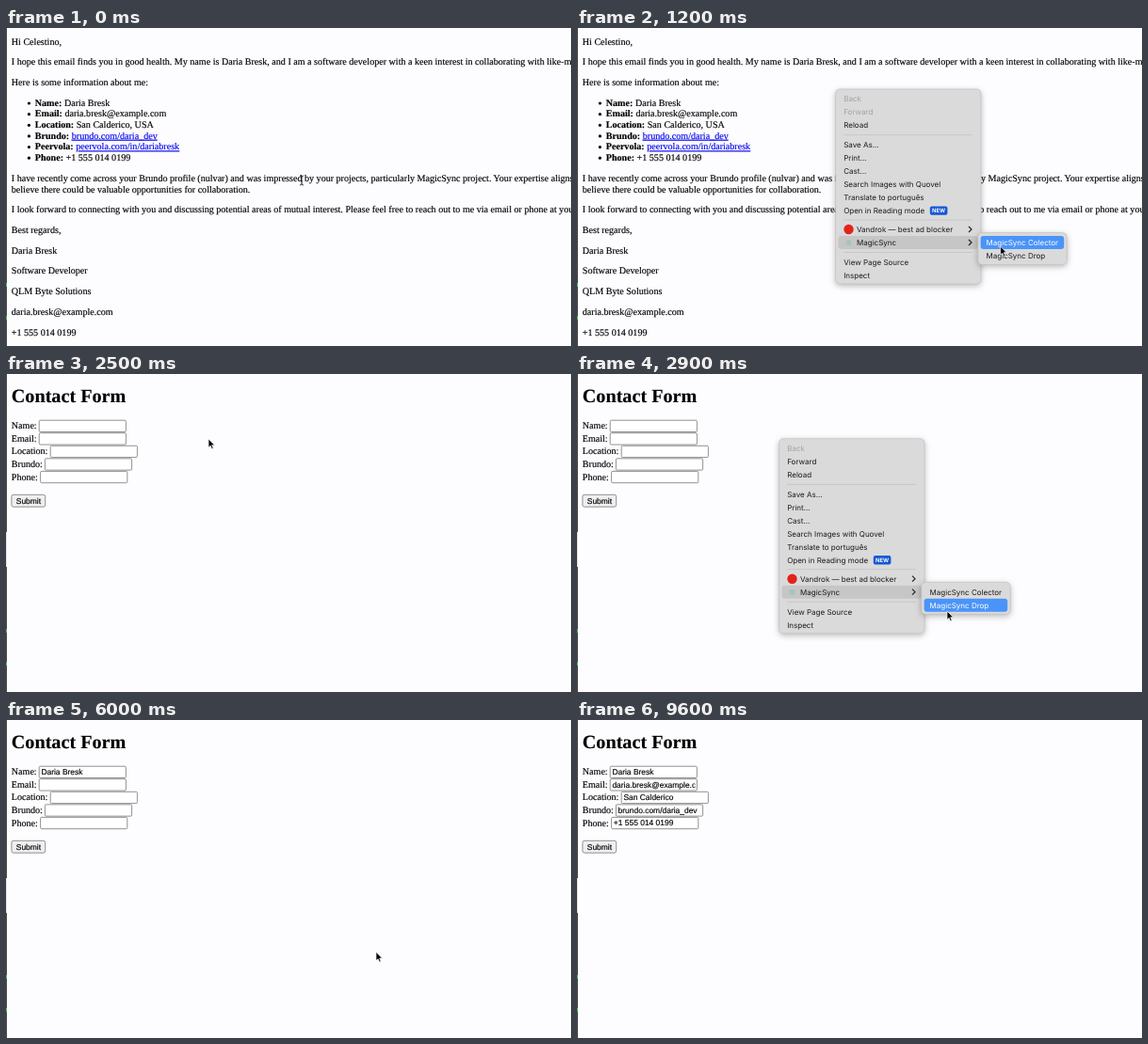
Recreate the animation shown at these times as an HTML page. Size 600 by 338 pixels, loop 9.9 s.

```html
<!DOCTYPE html>
<html lang="en">
<head>
<meta charset="utf-8">
<title>Form filler demo</title>
<style>
  html, body { margin: 0; width: 100%; height: 100%; overflow: hidden; background: #fdfcfe; }
  svg { display: block; width: 600px; height: 338px; }
  text { text-rendering: geometricPrecision; white-space: pre; }
  .page { font: 10.08px "Liberation Serif", Times, serif; }
  .page text { stroke: #000; stroke-width: .15; }
  .page .link { fill: #00e; stroke: #00e; text-decoration: underline; }
  .ui { font: 8.45px "Liberation Sans", Arial, sans-serif; }
  .menu { font: 8px Inter, sans-serif; }
  .panel { fill: #dadada; stroke: #bcbcbc; stroke-width: .6; }
  .shadow { filter: drop-shadow(0 2px 3px #0004); }
  .box { fill: #fff; stroke: #767676; stroke-width: .8; }
</style>
</head>
<body>
<svg viewBox="0 0 600 338">
  <defs>
    <clipPath id="emailClip"><rect x="36" y="62" width="89.5" height="14"/></clipPath>
  </defs>
  <rect width="600" height="338" fill="#fdfcfe"/>
  <rect width="1" height="338" fill="#4a4a4a"/>
  <path d="M.5 271v4M.5 306v4" stroke="#4fc04f"/>
  <g id="letter" class="page"></g>
  <g id="form" class="page">
    <rect y="168" width="1" height="37" fill="#e4e4e4"/>
    <text x="5.8" y="29.8" font-size="20.16" font-weight="bold">Contact Form</text>
    <rect class="box" x="5.9" y="128.3" width="35.8" height="12.9" rx="2" style="fill:#efefef"/>
    <text class="ui" x="10.8" y="137.8">Submit</text>
  </g>
  <g id="menu" class="menu">
    <g class="shadow"><rect class="panel" x="274.6" y="65" width="154.4" height="207" rx="4.5"/></g>
    <rect id="row" x="277.5" y="221" width="148.5" height="14" rx="3" fill="#c6c6c6"/>
    <path d="M283 113.7h137M283 204h137M283 238.5h137" stroke="#c2c2c2" stroke-width=".8"/>
    <circle cx="288.5" cy="214" r="5.2" fill="#e2231a"/>
    <circle cx="288.5" cy="228" r="3" fill="#a8c2c0"/>
    <rect x="374.8" y="189.4" width="18.6" height="9.4" rx="2" fill="#1558d6"/>
    <text x="384.1" y="196.3" font-size="5.9" font-weight="bold" fill="#fff" text-anchor="middle">NEW</text>
    <path d="M416 211l3 3-3 3M416 225l3 3-3 3" fill="none" stroke="#222" stroke-width="1.2"/>
    <g id="submenu">
      <g class="shadow"><rect class="panel" x="425.8" y="217.6" width="94.4" height="34" rx="4.5"/></g>
      <rect id="pick" x="428.6" width="88.6" height="14" rx="3" fill="#4a94f9"/>
    </g>
  </g>
  <g id="cursor">
    <path id="arrow" d="M0 0v9.2l2.1-1.9 1.5 3.3 1.6-.7-1.5-3.2h2.9z" stroke="#fff" stroke-width=".7"/>
    <path id="beam" d="M-2-5q2 0 2 1.5q0-1.5 2-1.5M-2 5q2 0 2-1.5q0 1.5 2 1.5M0-4v8M-1 1h2" fill="none" stroke="#222" stroke-width=".9"/>
  </g>
</svg>
<script>
const LOOP = 9900, STEP = 100;
const $ = id => document.getElementById(id);

function add(parent, tag, attrs, text = "") {
  const el = document.createElementNS("http://www.w3.org/2000/svg", tag);
  for (const key in attrs) el.setAttribute(key, attrs[key]);
  el.textContent = text;
  return parent.appendChild(el);
}
const show = (el, on) => el.setAttribute("visibility", on ? "inherit" : "hidden");

// Letter: [baseline, text]
const lines = [
  [17.6, "Hi Celestino,"],
  [39.3, "I hope this email finds you in good health. My name is Daria Bresk, and I am a software developer with a keen interest in collaborating with like-minded"],
  [61, "Here is some information about me:"],
  [163, "I have recently come across your Brundo profile (nulvar) and was impressed by your projects, particularly MagicSync project. Your expertise aligns with"],
  [174.6, "believe there could be valuable opportunities for collaboration."],
  [196.3, "I look forward to connecting with you and discussing potential areas of mutual interest. Please feel free to reach out to me via email or phone at your"],
  [218, "Best regards,"],
  [239.7, "Daria Bresk"],
  [261.4, "Software Developer"],
  [283.1, "QLM Byte Solutions"],
  [304.8, "daria.bresk@example.com"],
  [326.5, "+1 555 014 0199"],
];
for (const [y, text] of lines) add($("letter"), "text", { x: 5.8, y }, text);

const details = [
  ["Name:", "Daria Bresk"],
  ["Email:", "daria.bresk@example.com"],
  ["Location:", "San Calderico, USA"],
  ["Brundo:", "brundo.com/daria_dev", "link"],
  ["Peervola:", "peervola.com/in/dariabresk", "link"],
  ["Phone:", "+1 555 014 0199"],
];
details.forEach(([label, value, kind = ""], i) => {
  const y = 82.8 + i * 11.64;
  add($("letter"), "circle", { cx: 24.4, cy: y - 2.8, r: 1.6 });
  const line = add($("letter"), "text", { x: 30.8, y });
  add(line, "tspan", { "font-weight": "bold" }, label);
  add(line, "tspan", {}, " ");
  add(line, "tspan", { class: kind }, value);
});

// Form: [label, box x, value]
const fields = [
  ["Name:", 35.2, "Daria Bresk"],
  ["Email:", 35.2, "daria.bresk@example.com"],
  ["Location:", 47.2, "San Calderico"],
  ["Brundo:", 41.4, "brundo.com/daria_dev"],
  ["Phone:", 36.6, "+1 555 014 0199"],
].map(([label, x, value], i) => {
  const y = 58.3 + i * 13.55;
  add($("form"), "text", { x: 5.8, y }, label);
  add($("form"), "rect", { class: "box", x, y: y - 9.1, width: 92.2, height: 12.3, rx: 1.2 });
  const attrs = { class: "ui", x: x + 2.2, y: y - 0.2 };
  if (label === "Email:") attrs["clip-path"] = "url(#emailClip)";
  return add($("form"), "text", attrs, value);
});

// Context menu: [centre y, text, x]
const items = [
  [75.5, "Back"], [89.5, "Forward"], [103.5, "Reload"],
  [124, "Save As..."], [138, "Print..."], [152, "Cast..."],
  [166, "Search Images with Quovel"], [180, "Translate to português"], [194, "Open in Reading mode"],
  [214, "Vandrok — best ad blocker", 297], [228, "MagicSync", 297],
  [249, "View Page Source"], [263, "Inspect"],
].map(([y, text, x = 283.2]) => add($("menu"), "text", { x, y: y + 2.9, fill: "#1c1c1c" }, text));
items[0].setAttribute("fill", "#a3a3a3");
const choices = ["MagicSync Colector", "MagicSync Drop"].map((text, i) =>
  add($("submenu"), "text", { x: 434.6, y: 230.9 + i * 14 }, text));

// open, row highlighted, choice made, fully closed, offset, chosen entry
const menus = [
  { open: 500, row: 800, pick: 1000, end: 1600, dx: 0, dy: 0, choice: 0 },
  { open: 2600, row: 2800, pick: 2900, end: 4500, dx: -60, dy: 3.7, choice: 1 },
];

// Pointer path: [time, x, y]
const path = [
  [0, 314, 162], [100, 314, 162], [400, 275, 68], [600, 275, 68], [800, 370, 228],
  [1000, 449.6, 232], [2300, 449.6, 232], [2500, 215, 69], [2600, 215, 69],
  [2800, 345, 232], [2900, 393, 252], [3100, 393, 252], [3200, 393, 246.6],
  [7400, 393, 246.6], [8100, 373.8, 182], [LOOP, 373.8, 182],
];
function pointer(t) {
  const i = path.findIndex(p => p[0] > t);
  const [t0, x0, y0] = path[i - 1], [t1, x1, y1] = path[i];
  const k = (t - t0) / (t1 - t0), e = k * k * (3 - 2 * k);
  return [x0 + (x1 - x0) * e, y0 + (y1 - y0) * e];
}

function drawMenu(t) {
  const m = menus.find(m => t >= m.open && t < m.end);
  show($("menu"), m);
  if (!m) return;
  $("menu").setAttribute("transform", `translate(${m.dx} ${m.dy})`);
  $("menu").setAttribute("opacity", Math.min(1, (m.end - t) / 300));
  show($("row"), t >= m.row);
  show($("submenu"), t >= m.row);
  show($("pick"), t >= m.pick);
  $("pick").setAttribute("y", 221 + m.choice * 14);
  items[1].setAttribute("fill", m.choice ? "#1c1c1c" : "#a3a3a3");
  choices.forEach((el, i) =>
    el.setAttribute("fill", t >= m.pick && i === m.choice ? "#fff" : "#1c1c1c"));
}

function draw(now) {
  const t = Math.floor(now % LOOP / STEP) * STEP;
  show($("letter"), t < 2100);
  show($("form"), t >= 2100);
  fields.forEach((el, i) => show(el, t >= 5480 + i * 910));
  drawMenu(t);
  show($("cursor"), t < 9500);
  show($("beam"), t < 500);
  show($("arrow"), t >= 500);
  $("cursor").setAttribute("transform", `translate(${pointer(t)})`);
}

const start = performance.now();
function frame() {
  draw(performance.now() - start);
  requestAnimationFrame(frame);
}
frame();
</script>
</body>
</html>
```
